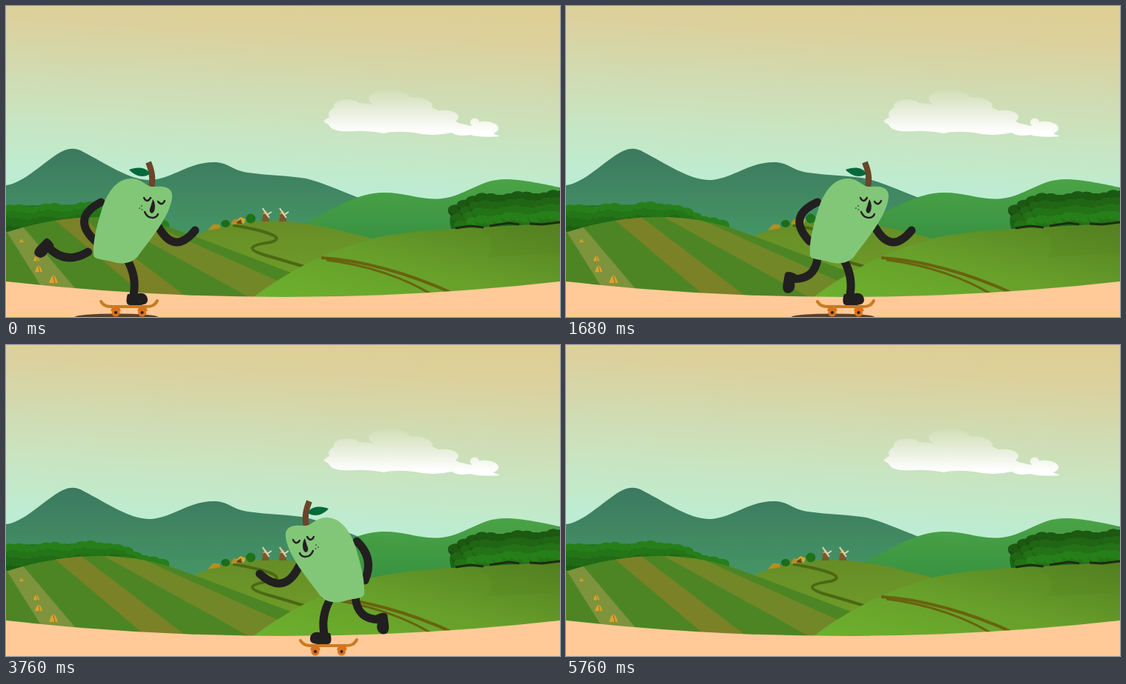
Recreate the animation shown at these times as an HTML page. Size 747 px wide and 420 px high, loop 5.8 s.

```html
<!DOCTYPE html>
<html lang="en">
<head>
<meta charset="utf-8">
<title>Skating fruit</title>
<style>
  html, body { margin: 0; width: 100%; height: 100%; overflow: hidden; }
  svg { display: block; width: 100vw; height: 100vh; }
  .limb { fill: none; stroke: #221f20; stroke-width: 11; stroke-linecap: round; }
  .ink { fill: none; stroke: #221f20; stroke-width: 2.4; stroke-linecap: round; }
</style>
</head>
<body>
<svg viewBox="0 0 747 420" preserveAspectRatio="none">
  <defs>
    <linearGradient id="sky" gradientUnits="userSpaceOnUse" x1="380" y1="0" x2="368" y2="250">
      <stop offset="0" stop-color="#decf97"/><stop offset=".15" stop-color="#dbd19d"/>
      <stop offset=".45" stop-color="#d0dcb3"/><stop offset=".75" stop-color="#c6e7c5"/>
      <stop offset="1" stop-color="#bcedd3"/>
    </linearGradient>
    <linearGradient id="cloud" gradientUnits="userSpaceOnUse" x1="0" y1="113" x2="0" y2="170">
      <stop offset="0" stop-color="#d2deb6"/><stop offset=".45" stop-color="#e5ecd7"/><stop offset="1" stop-color="#fff"/>
    </linearGradient>
    <linearGradient id="mountain" x2="0" y2="1">
      <stop offset="0" stop-color="#3c795f"/><stop offset="1" stop-color="#469a66"/>
    </linearGradient>
    <linearGradient id="far" x2="0" y2="1">
      <stop offset="0" stop-color="#4ba346"/><stop offset="1" stop-color="#348d40"/>
    </linearGradient>
    <linearGradient id="middle" x2="0" y2="1">
      <stop offset="0" stop-color="#668d26"/><stop offset="1" stop-color="#72a12b"/>
    </linearGradient>
    <linearGradient id="front" x1="0" y1="1" x2="1" y2="0">
      <stop offset="0" stop-color="#6db22e"/><stop offset=".5" stop-color="#679f2a"/><stop offset="1" stop-color="#557f21"/>
    </linearGradient>
    <clipPath id="fieldShape"><path d="M0 306C40 292 90 284 130 285C175 286 208 294 235 304L310 332L400 366V420H0Z"/></clipPath>
  </defs>

  <path fill="url(#sky)" d="M0 0H747V420H0Z"/>
  <g id="clouds" fill="url(#cloud)">
    <path d="M428 156Q434 148 447 149L480 135L560 130L585 142L610 158L640 165L666 176Q640 178 626 174Q610 177 601 171Q575 177 550 171Q525 168 509 172Q488 168 470 169Q438 171 435 160Z"/>
  </g>
  <path fill="url(#mountain)" d="M0 242C20 240 42 219 62 205C78 193 90 189 104 197C135 213 165 234 192 235C222 235 245 211 280 211C301 211 302 221 326 225C355 229 382 229 405 233C432 240 460 254 490 264V330H0Z"/>
  <path fill="url(#far)" d="M380 302C430 284 465 252 510 252C540 252 560 263 588 260C620 256 640 234 672 234C700 234 730 242 747 245V340H380Z"/>
  <g id="rightForest"></g>
  <path fill="url(#middle)" d="M245 314C285 297 322 290 360 290C414 291 462 307 520 320V395H245Z"/>
  <path d="M306 296C342 302 382 312 357 319C328 323 318 329 362 340L402 352" fill="none" stroke="#4b6814" stroke-width="4"/>
  <g id="village"></g>
  <g id="leftForest"></g>
  <g id="field" clip-path="url(#fieldShape)"><path fill="#4d8524" d="M0 280H400V420H0Z"/></g>
  <path fill="url(#front)" d="M325 400C390 348 465 318 520 309C580 300 670 298 747 293V400Z"/>
  <path fill="#527e21" opacity=".2" d="M640 303C658 311 659 328 648 339L747 334V293Z"/>
  <g fill="none" stroke="#69620f">
    <path d="M425 340C480 343 545 362 600 387" stroke-width="4"/>
    <path d="M432 343C490 350 540 369 573 389" stroke-width="3"/>
  </g>
  <path d="M606 300l20 -3 18 2M652 297l26 -4 14 2M706 294l17 1 24 -3" fill="none" stroke="#1c2c10" stroke-width="3"/>
  <g id="hay" fill="#d8a52d"></g>
  <path fill="#ffca98" d="M0 372Q374 414 747 372V420H0Z"/>

  <g id="shadow"><ellipse cx="149" cy="420" rx="56" ry="4.5" fill="#594229"/></g>
  <g id="board">
    <path d="M-38 -7C-34 0 -28 0 -21 0H22C31 0 35 -2 38 -8" fill="none" stroke="#c97b22" stroke-width="4" stroke-linecap="round"/>
    <g fill="#db711d"><path d="M-23 1h10l2 5h-14zM13 1h10l2 5h-14z"/><circle cx="-18" cy="8" r="5.5"/><circle cx="17.5" cy="8" r="5.5"/></g>
    <g fill="#221f20"><circle cx="-18" cy="8" r="2"/><circle cx="17.5" cy="8" r="2"/></g>
  </g>
  <g id="fruit">
    <path class="limb" id="frontArm"/><path class="limb" id="backArm"/>
    <path class="limb" id="standLeg"/><path class="limb" id="kickLeg"/>
    <path class="foot" id="standFoot"/><path class="foot" id="kickFoot"/>
    <g id="torso">
      <path d="M196 245C199 231 196 221 192 211" fill="none" stroke="#69452a" stroke-width="8"/>
      <path d="M166 221C176 217 190 217 194 227C186 232 175 231 166 221Z" fill="#046a3b"/>
      <path d="M167 233C148 234 136 254 130 272C122 298 117 318 118 336C119 343 132 342 142 345C152 349 168 349 177 339C192 318 222 284 224 258C225 244 212 243 200 244C188 245 184 232 167 233Z" fill="#82c777"/>
      <path class="ink" d="M186 259Q190 267 195 259M205 264Q210 271 214 263"/>
      <path class="ink" d="M187 278C191 288 202 288 205 281" stroke-width="3"/>
      <path d="M198 261C202 266 202 278 197 280C193 279 193 275 195 271Z" fill="#221f20"/>
      <path d="M180 273h0M183.500 275h0M183 270h0" stroke="#3c5a36" stroke-width="2" stroke-linecap="round"/>
    </g>
  </g>
</svg>
<script>
const $ = id => document.getElementById(id);
const add = (id, markup) => $(id).insertAdjacentHTML('beforeend', markup);
const ellipse = (x, y, rx, ry, fill) =>
  `<ellipse cx="${x}" cy="${y}" rx="${rx}" ry="${ry}"${fill ? ` fill="${fill}"` : ''}/>`;
const clamp = v => Math.min(1, Math.max(0, v));
const lerp = (a, b, k) => a + (b - a) * k;

// Scenery made of repeated parts
for (const [x, y, r] of [[517, 125, 28], [460, 135, 18], [545, 135, 30], [475, 146, 40], [590, 150, 20], [632, 157, 6], [645, 165, 19]])
  add('clouds', ellipse(x, y, r, 4 + r * .27));

// Rows of bushes from back to front; each row gets a shade between two lightness values.
function forest(id, x0, x1, rows, top, light0, light1) {
  for (let row = 0; row < rows; row++) {
    const light = lerp(light0, light1, row / (rows - 1));
    for (let x = x0; x < x1; x += 12) {
      const y = top(x) + row * 9 + Math.sin(x * 1.7 + row) * 2;
      add(id, ellipse(x + row * 4, y + 2, 10, 8, `hsl(112 66% ${light - 3}%)`) +
        ellipse(x + row * 4, y, 10, 6, `hsl(112 66% ${light}%)`));
    }
  }
}
add('leftForest', '<path fill="#1d6712" d="M0 270L130 268L220 302L130 305H0Z"/>');
forest('leftForest', -6, 214, 3, x => x < 135 ? 276 - x * .035 : 271 + (x - 135) * .34, 30, 25);
add('rightForest', '<path fill="#1c6418" d="M600 300Q592 274 622 268L747 262V302H600Z"/>');
forest('rightForest', 606, 755, 4, x => 261 - (x - 606) * .035 + 14 * Math.exp((606 - x) / 12), 21, 30);

// Ploughed stripes fan out from the top of the field.
const edges = [[-12, 57], [11, 104], [60, 190], [100, 245], [130, 329], [172, 417]];
['#7d933c', '#7b8127', '#728728'].forEach((fill, i) => {
  const [[a, b], [c, d]] = edges.slice(i * 2);
  add('field', `<path fill="${fill}" d="M${a} 284H${c}L${d} 394H${b}Z"/>`);
});

for (const [x, y] of [[21, 317], [41, 341], [44, 355], [64, 369]])
  add('hay', `<g transform="translate(${x} ${y}) scale(${(y - 270) / 100})">` +
    '<path d="M-6 5Q-3 -5 0 -5Q3 -5 6 5Z"/><path d="M0 -4L2 5" stroke="#8a641d"/></g>');

add('village', '<path fill="#b98d20" d="M272 303L279 295H288L289 300ZM303 295L307 288L315 289L314 295Z"/>' +
  '<path fill="#d8a62a" d="M311 290L316 285L323 288L321 294Z"/><path fill="#67441c" d="M312 291L317 288L318 294H311Z"/>' +
  ellipse(296, 294, 6, 5, '#1e6b19') + ellipse(330, 287, 6.5, 6.5, '#1f7418'));
for (const x of [350, 373])
  add('village', `<g transform="translate(${x} 282)"><path fill="#7d562b" d="M-5 9L-3 -2H3L5 9Z"/>` +
    '<path fill="#d39a31" d="M-4 -1L0 -6L4 -1Z"/>' +
    '<path d="M-4 -9L2 0L8 -4M2 0L5 4" fill="none" stroke="#d5d6bb" stroke-width="2"/></g>');

for (const foot of document.querySelectorAll('.foot')) {
  foot.setAttribute('d', 'M-7-6L5-6C12-9 20-6 20 2C20 7 15 9 8 9H-4C-10 9 -9 0 -7-6Z');
  foot.setAttribute('fill', '#221f20');
}

const PIVOT = [171, 290];
const STRIDE_TIME = 2, SLIP_START = 4.16, SLIP_MID = 4.4, LAND = 4.72, REST = 5.32;
// Hand positions; ankles carry the foot angle, body is shift and turn.
const SLIP = { body: [38, -6, -68], hand: [263, 210], backHand: [212, 338], stand: [313, 304, -74], kick: [245, 393, 20] };
const LYING = { body: [46, 72, -112], hand: [282, 330], backHand: [80, 408], stand: [322, 393, 0], kick: [310, 396, 0] };

const blend = (a, b, k) => ({ ...a, ...Object.fromEntries(
  Object.keys(b).map(part => [part, a[part].map((v, i) => lerp(v, b[part][i], k))])) });

// The kicking leg swings from behind (0) to beside the board (1) and back.
function ridePose(phase, hand, armBend) {
  const s = (1 - Math.cos(2 * Math.PI * (phase - .08))) / 2;
  return {
    body: [0, 0, 0], hand, armBend,
    backHand: [121 - 31 * s ** 3, 318],
    stand: [171, 395, 0],
    hip: [108 + 44 * s, 331 + 17 * s],
    kick: [50 + 90 * s, 316 + 138 * s - 57 * s * s, 140 - 85 * s]
  };
}
const rideRight = t => ridePose(t / STRIDE_TIME, [255, 303], -38);
const rideLeft = t => ridePose((t - 3.76) / STRIDE_TIME + .83, [259, 309], -19);

function fallPose(t) {
  if (t < SLIP_MID) return blend(rideLeft(SLIP_START), SLIP, (t - SLIP_START) / (SLIP_MID - SLIP_START));
  return blend({ ...rideLeft(SLIP_START), ...SLIP }, LYING, clamp((t - SLIP_MID) / (LAND - SLIP_MID)) ** 1.5);
}

const leftX = t => { const s = Math.min(t, SLIP_START) - 3.76; return 601 - 400 * s + 160 * s * s; };

// The board shoots ahead, then flies up and drops under gravity.
function boardState(t) {
  if (t < SLIP_MID) {
    const k = (t - SLIP_START) / (SLIP_MID - SLIP_START);
    return [lerp(301, 129, k), lerp(406, 300, k * k), 157 * k];
  }
  const flight = Math.min(t, 5.25) - 4.78, k = clamp((t - SLIP_MID) / .85);
  return [lerp(129, 93, k), Math.min(406, 145 + 1073 * flight * flight), lerp(157, 720, k)];
}

function place(id, x, y, angle, pivot = '') {
  $(id).setAttribute('transform', `translate(${x} ${y}) rotate(${angle}${pivot})`);
}

// A limb is one bow from its joint on the torso to its end, bent sideways.
function drawLimb(id, [x, y], [endX, endY], bend, [shiftX, shiftY, turn]) {
  const a = turn * Math.PI / 180, rx = x - PIVOT[0], ry = y - PIVOT[1];
  const jointX = PIVOT[0] + shiftX + rx * Math.cos(a) - ry * Math.sin(a);
  const jointY = PIVOT[1] + shiftY + rx * Math.sin(a) + ry * Math.cos(a);
  const dx = endX - jointX, dy = endY - jointY, k = bend / Math.hypot(dx, dy);
  $(id).setAttribute('d', `M${jointX} ${jointY}Q${jointX + dx / 2 + dy * k} ${jointY + dy / 2 - dx * k} ${endX} ${endY}`);
}

function drawPose({ body, hand, backHand, stand, kick, hip, armBend }) {
  drawLimb('frontArm', [206, 299], hand, -36, body);
  drawLimb('backArm', [128, 265], backHand, armBend, body);
  drawLimb('standLeg', [163, 342], stand, 11, body);
  drawLimb('kickLeg', hip, kick, 23, body);
  place('standFoot', ...stand);
  place('kickFoot', ...kick);
  place('torso', ...body, ` ${PIVOT}`);
}

function draw(t) {
  const right = t < 2.72, left = t >= 3 && t < 5.76;
  $('fruit').style.display = $('board').style.display = right || left ? '' : 'none';
  $('shadow').style.display = right ? '' : 'none';
  if (right) {
    const x = 91.1 * t + 6.9 * t ** 4.1;
    drawPose(rideRight(t));
    place('fruit', x, 0, 0);
    place('shadow', x, 0, 0);
    place('board', 166 + x, 406, 0);
  } else if (left) {
    const x = leftX(t), falling = t > SLIP_START;
    const bounce = t > LAND ? 14 * clamp((REST - t) / (REST - LAND)) ** 2 * Math.abs(Math.sin((t - LAND) * 13)) : 0;
    drawPose(falling ? fallPose(t) : rideLeft(t));
    $('fruit').setAttribute('transform', `translate(${x} ${-bounce}) scale(-1 1)`);
    place('board', ...(falling ? boardState(t) : [x - 166, 406, 0]));
  }
}

const start = performance.now();
function tick() {
  const elapsed = (performance.now() - start) % 5800;
  draw(Math.floor(elapsed / 40) * .04);
  requestAnimationFrame(tick);
}
tick();
</script>
</body>
</html>
```
